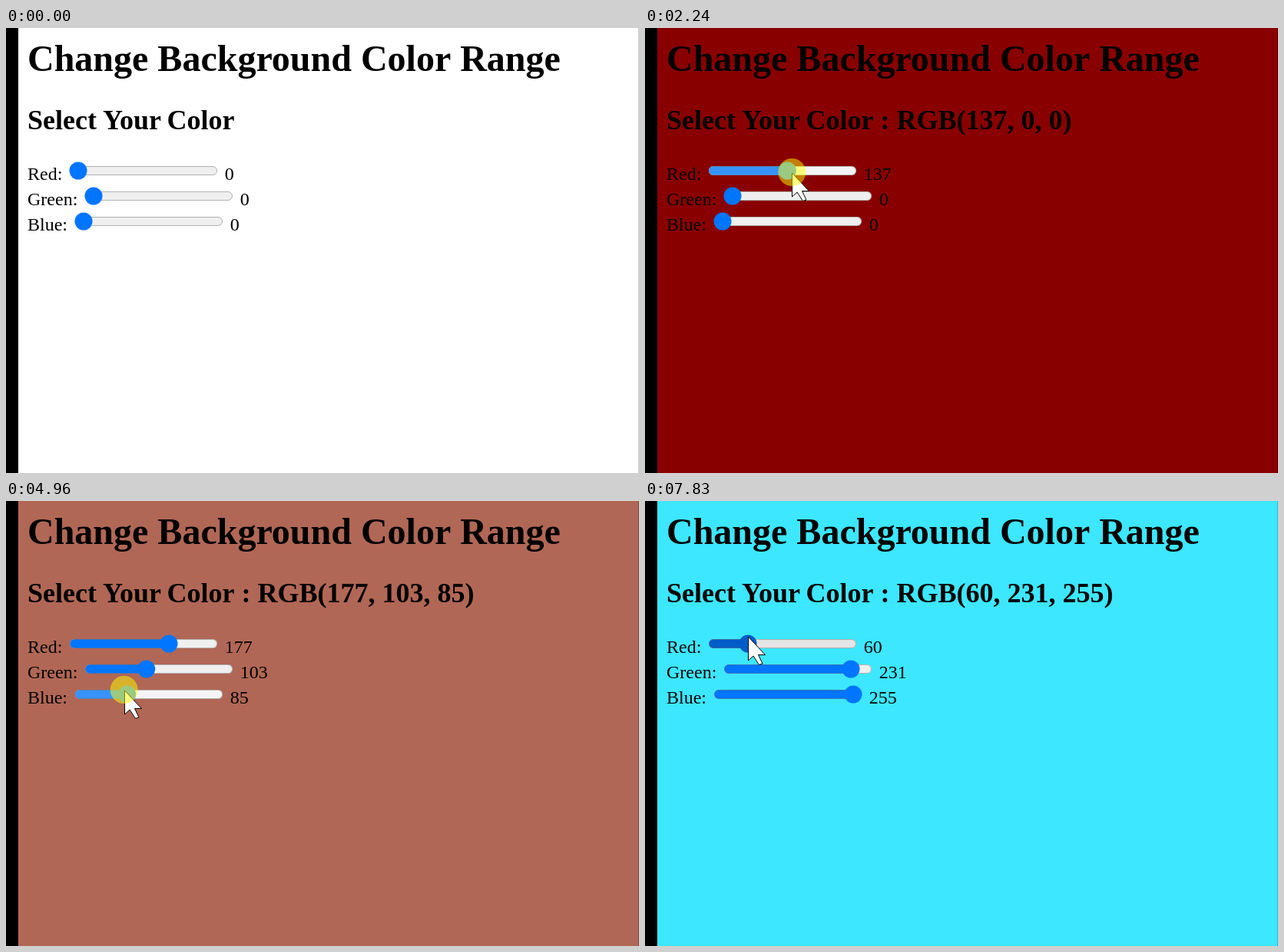
An HTML page with a canvas that plays this animation: 824 by 580 pixels, repeating every 8000 ms.

```html
<!DOCTYPE html>
<html lang="en">
<head>
<meta charset="utf-8">
<title>Color range</title>
<style>
  html, body { margin: 0; width: 100%; height: 100%; overflow: hidden; background: #fff; }
  canvas { display: block; }
</style>
</head>
<body>
<canvas width="824" height="580"></canvas>
<script>
const ctx = document.querySelector('canvas').getContext('2d');

// The picture refreshes once per tick; all moments below are tick counts.
const LOOP = 8000, TICK = 77.7, LEAD = 22;
const ENTER = 3, FIRST_INPUT = 26;
const missedClick = { press: 10, release: 14, x: 81, y: 184 };

const sliders = [
  { name: 'Red:', x: 83, y: 186 },
  { name: 'Green:', x: 103, y: 219 },
  { name: 'Blue:', x: 90, y: 252 }
];
const [red, green, blue] = sliders;

// grip: pointer offset from the thumb; via: a point passed on the way to the thumb
const drags = [
  { slider: red, to: 177, press: 24, start: 25.6, end: 30, release: 32,
    grip: { x: 6, y: 3 }, via: { k: 18, x: 103, y: 192 } },
  { slider: green, to: 103, press: 43, start: 43.34, end: 49, release: 51,
    grip: { x: 7, y: -7 }, via: { k: 37, x: 160, y: 205 } },
  { slider: blue, to: 255, press: 61, start: 62.5, end: 67, release: 69,
    grip: { x: -4, y: -5 }, via: { k: 57, x: 105, y: 236 } },
  { slider: green, to: 231, press: 79, start: 80, end: 84, release: 86,
    grip: { x: 4, y: -6 }, via: { k: 75, x: 217, y: 213 } },
  { slider: red, to: 60, press: 92, start: 93, end: 98, release: 99,
    grip: { x: 0, y: -9 }, via: { k: 90, x: 223, y: 175 } }
];

const looks = {
  idle: { track: '#efefef', fill: '#0075ff' },
  hover: { track: '#e5e5e5', fill: '#005cc8' },
  active: { track: '#f5f5f5', fill: '#3793ff' }
};

const mix = (a, b, p) => a + (b - a) * Math.min(1, Math.max(0, p));

const valueAt = (slider, k) => Math.round(drags
  .filter(d => d.slider === slider)
  .reduce((v, d) => mix(v, d.to, (k - d.start) / (d.end - d.start)), 0));

const thumbX = (slider, k) => slider.x + 11 + 170 * valueAt(slider, k) / 255;

function pointerAt(k) {
  const held = d => ({ x: thumbX(d.slider, k) + d.grip.x, y: d.slider.y + d.grip.y });
  if (k < missedClick.release) {
    const decay = 0.53 ** (k - ENTER);
    return { x: missedClick.x + 525 * decay, y: missedClick.y + 359 * decay };
  }
  const i = drags.findLastIndex(d => k >= d.press);
  const last = drags[i], next = drags[i + 1];
  if (last && (k < last.release || !next)) return held(last);

  const from = last ? { k: last.release, ...held(last) } : { ...missedClick, k: missedClick.release };
  const to = { k: next.press, ...held(next) };
  const [a, b] = k < next.via.k ? [from, next.via] : [next.via, to];
  const p = (k - a.k) / (b.k - a.k);
  return { x: mix(a.x, b.x, p), y: mix(a.y, b.y, p) };
}

function text(string, x, y, size, weight = 'normal') {
  ctx.font = `${weight} ${size}px "Liberation Serif", "Times New Roman", serif`;
  ctx.fillStyle = '#000';
  ctx.fillText(string, x, y);
}

function disc(x, y, r, color) {
  ctx.fillStyle = color;
  ctx.beginPath();
  ctx.arc(x, y, r, 0, Math.PI * 2);
  ctx.fill();
}

function bar(x, y, width, color) {
  ctx.fillStyle = color;
  ctx.beginPath();
  ctx.roundRect(x, y, width, 12, 6);
  ctx.fill();
}

function drawSlider(slider, k, pointer, press) {
  const { name, x, y } = slider;
  const thumb = thumbX(slider, k);
  const over = pointer && !press && pointer.x >= x && pointer.x <= x + 192 && Math.abs(pointer.y - y) < 12;
  const overThumb = over && Math.hypot(pointer.x - thumb, pointer.y - y) < 11.5;
  const active = press && press.slider === slider;
  const look = active ? looks.active : over ? looks.hover : looks.idle;

  text(name, 28, y + 12, 24);
  bar(x, y - 6, 192, look.track);
  bar(x, y - 6, thumb - x, look.fill);
  ctx.strokeStyle = 'rgba(118,118,118,.5)';
  ctx.lineWidth = 1;
  ctx.beginPath();
  ctx.roundRect(x + .5, y - 5.5, 191, 11, 5.5);
  ctx.stroke();
  disc(thumb, y, 11.5, active || overThumb ? look.fill : looks.idle.fill);
  text(valueAt(slider, k), x + 201.7, y + 12, 24);
}

const arrow = new Path2D('M.5 0v31l6.5-6 7.5 11.5 4.5-1.5-5.5-11.5h9z');

function drawPointer({ x, y }) {
  ctx.save();
  ctx.translate(Math.round(x), Math.round(y));
  ctx.fillStyle = '#fff';
  ctx.fill(arrow);
  ctx.strokeStyle = '#000';
  ctx.lineWidth = 1;
  ctx.stroke(arrow);
  ctx.restore();
}

function draw(k) {
  const pointer = k >= ENTER ? pointerAt(k) : null;
  const press = [missedClick, ...drags].find(d => k >= d.press && k < d.release);
  const picked = k >= FIRST_INPUT;
  const rgb = sliders.map(s => valueAt(s, k)).join(', ');

  ctx.fillStyle = picked ? `rgb(${rgb})` : '#fff';
  ctx.fillRect(0, 0, 824, 580);
  ctx.fillStyle = '#000';
  ctx.fillRect(0, 0, 16, 580);
  ctx.fillStyle = 'rgba(0,0,0,.22)';
  ctx.fillRect(823, 0, 1, 580);

  text('Change Background Color Range', 28, 56, 48, 'bold');
  text('Select', 28, 132, 36, 'bold');
  text('Your', 126, 132, 36, 'bold');
  text('Color' + (picked ? ` : RGB(${rgb})` : ''), 209.5, 132, 36, 'bold');

  sliders.forEach(s => drawSlider(s, k, pointer, press));
  if (pointer) drawPointer(pointer);
  if (press) disc(pointer.x, pointer.y - 1, 18, 'rgba(255,255,0,.5)');
}

function frame() {
  const now = performance.now() % LOOP;
  draw(Math.floor((now + LEAD) / TICK));
  requestAnimationFrame(frame);
}
frame();
</script>
</body>
</html>
```
